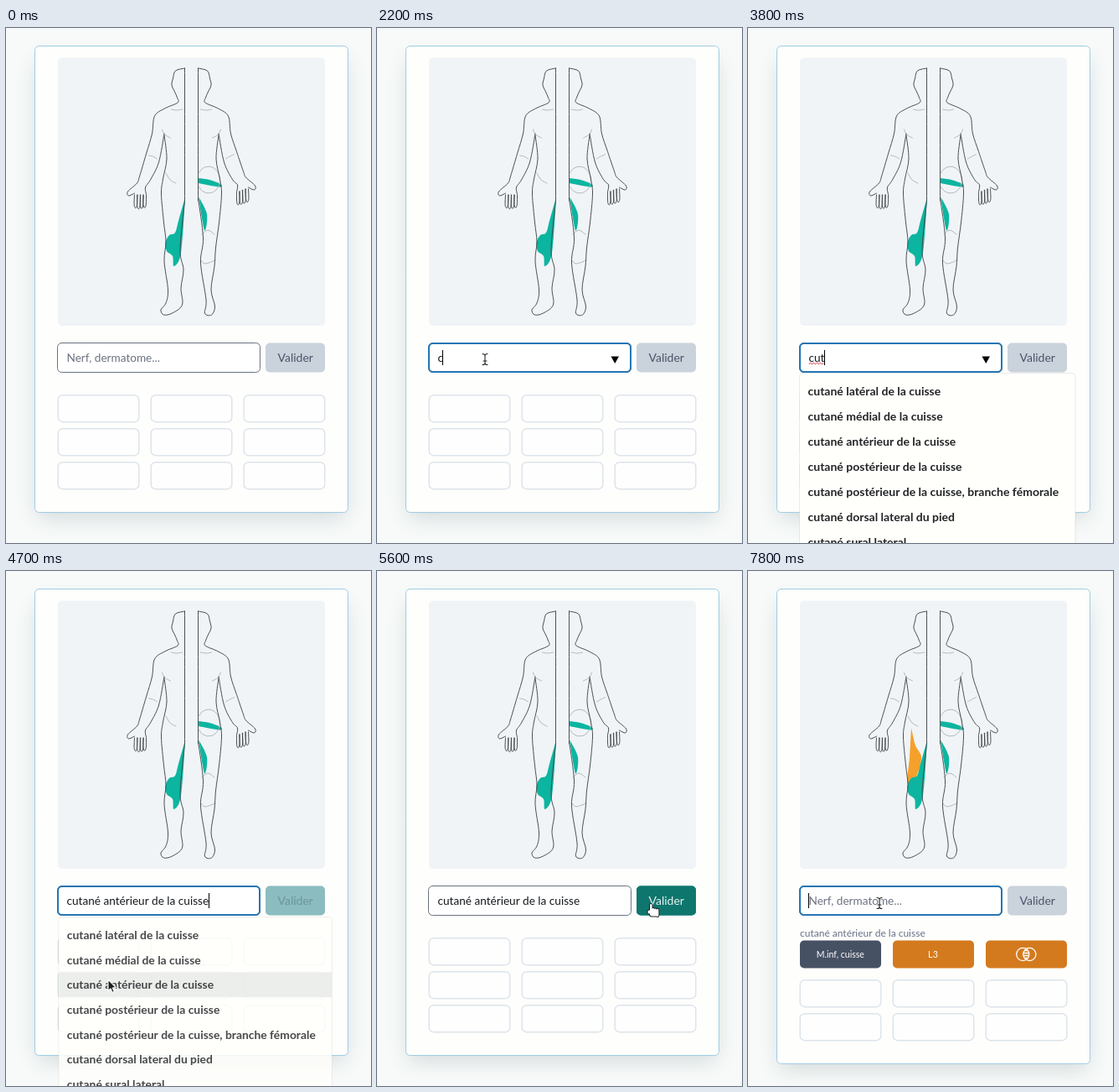
Write an HTML page with a canvas that moves like this. It is 436 by 614 pixels and loops after 8 s.

```html
<!DOCTYPE html>
<html lang="fr">
<head>
<meta charset="utf-8">
<title>Nerf, dermatome</title>
<style>
html, body { margin: 0; width: 100%; height: 100%; overflow: hidden; background: #f7faf9; }
canvas { display: block; width: 436px; height: 614px; }
</style>
</head>
<body>
<canvas id="stage"></canvas>
<script>
const W = 436, H = 614, LOOP = 8000, STEP = 100;
const FONT = 'Lato, "Open Sans", sans-serif';
const TEAL = '#0cb5a0', ORANGE = '#f5a02a', INK = '#454749', FAINT = '#a3a9ae';
const ANSWER = 'cutané antérieur de la cuisse';
const OPTIONS = [
  'cutané latéral de la cuisse', 'cutané médial de la cuisse', ANSWER,
  'cutané postérieur de la cuisse', 'cutané postérieur de la cuisse, branche fémorale',
  'cutané dorsal lateral du pied', 'cutané sural lateral'
];
const FOCUS = 1300, OPEN = 2400, SELECT = 4700, BLUR = 5600, RESULT = 5900, REFOCUS = 7800;
const TYPED = [[2000, 'c'], [OPEN, 'cu'], [2600, 'cut'], [SELECT, ANSWER], [RESULT, '']];
const ROW = 30, LIST_TOP = 418;

const canvas = document.getElementById('stage');
const ctx = canvas.getContext('2d');
const dpr = window.devicePixelRatio || 1;
canvas.width = W * dpr;
canvas.height = H * dpr;

const clamp = v => Math.max(0, Math.min(1, v));
const ramp = (t, from, to) => clamp((t - from) / (to - from));
const ease = k => k * k * (3 - 2 * k);
const mix = (a, b, k) => a + (b - a) * k;
const within = (t, from, to) => t >= from && t < to;

function box(x, y, w, h, r, fill, stroke, lw = 1) {
  ctx.beginPath();
  ctx.roundRect(x, y, w, h, r);
  if (fill) { ctx.fillStyle = fill; ctx.fill(); }
  if (stroke) { ctx.strokeStyle = stroke; ctx.lineWidth = lw; ctx.stroke(); }
}

function text(str, x, y, size, color, align = 'left', weight = 400) {
  ctx.font = `${weight} ${size}px ${FONT}`;
  ctx.textAlign = align;
  ctx.fillStyle = color;
  ctx.fillText(str, x, y);
}

function faded(alpha, draw) {
  if (alpha <= 0) return;
  ctx.save();
  ctx.globalAlpha *= alpha;
  draw();
  ctx.restore();
}

// Smooth curve through key points
function curve(points) {
  const path = new Path2D(), last = points.length - 1;
  const at = i => points[Math.max(0, Math.min(last, i))];
  path.moveTo(...points[0]);
  for (let i = 0; i < last; i++) {
    const [a, b, c, d] = [at(i - 1), at(i), at(i + 1), at(i + 2)];
    path.bezierCurveTo(b[0] + (c[0] - a[0]) / 6, b[1] + (c[1] - a[1]) / 6,
      c[0] - (d[0] - b[0]) / 6, c[1] - (d[1] - b[1]) / 6, c[0], c[1]);
  }
  return path;
}

// Half a body: x is the distance from the midline
const ARM = [[0, 48], [11, 51], [14, 60], [15.5, 68], [12, 76], [9, 83], [8.5, 89], [24, 96],
  [36, 105], [39, 126], [46, 150], [54, 177], [57, 185], [68, 195], [67, 200], [60, 197]];
const INNER_ARM = [[46, 198], [47, 190], [41, 181], [31, 160], [24.5, 126]];
const FLANK = [[24.5, 128], [21.5, 156], [26, 180], [28, 198], [25, 232]];
const FRONT_LEG = [[22.5, 255], [24.5, 278], [20, 312], [22.5, 328], [28.5, 336], [25, 342], [15, 340],
  [3, 330], [4.5, 310], [1.5, 288], [5.5, 264], [0, 206]];
const BACK_LEG = [[21, 262], [19.5, 284], [15.5, 312], [20, 332], [16, 342], [8, 340], [9.5, 324],
  [3, 280], [6, 250], [0, 203]];

function finger(i) {
  const x = 60 - 3.6 * i, tip = 216 - Math.abs(i - 1.3);
  return [[x, 199], [x + 0.4, tip - 4], [x - 1.3, tip], [x - 3, tip - 4], [x - 3.2, 199]];
}

function halfBody(midline, dir, lift, leg) {
  const place = ([d, y]) => [midline + dir * d, y - lift * ramp(d, 40, 56)];
  const parts = [ARM, INNER_ARM, [...FLANK, ...leg], [[0, 48], [0, 206]], ...[0, 1, 2, 3].map(finger)];
  const folds = [[[27, 121], [24, 127], [17, 131]], [[43, 152], [38, 153], [33, 156]], [[3, 97], [10, 98], [16, 97]]];
  const paths = list => list.map(p => curve(p.map(place)));
  return { lines: paths(parts), folds: paths(folds) };
}

const halves = [halfBody(213.5, -1, 0, FRONT_LEG), halfBody(229.5, 1, 7, BACK_LEG)];
const creases = [
  [[191, 173], [196, 181], [203, 185]],
  [[234, 246], [241, 241], [249, 246]],
  [[233, 277], [238, 281], [250, 277]]
].map(curve);
const zones = [
  [[214, 202], [206, 230], [202, 244], [195, 247], [190.5, 256], [192, 266], [199, 272], [200.5, 284], [209, 268], [214, 202]],
  [[230, 179], [243, 181], [256, 186], [255, 189.5], [230, 185]],
  [[230, 201], [240, 222], [237, 241], [230, 201]]
].map(curve);
const thigh = curve([[195, 187], [200, 208], [207, 222], [201, 245], [190.5, 253], [193, 222], [195, 187]]);

function drawBody(found) {
  box(62, 35.5, 319, 319.5, 5, '#f0f4f7');
  faded(found, () => { ctx.fillStyle = ORANGE; ctx.fill(thigh); });
  ctx.fillStyle = TEAL;
  zones.forEach(z => ctx.fill(z));
  ctx.lineJoin = ctx.lineCap = 'round';
  ctx.lineWidth = 0.8;
  ctx.strokeStyle = FAINT;
  creases.forEach(c => ctx.stroke(c));
  halves.forEach(h => h.folds.forEach(f => ctx.stroke(f)));
  ctx.beginPath();
  ctx.ellipse(242, 181, 13.5, 16, 0, -2.6, 2.6);
  ctx.stroke();
  ctx.lineWidth = 0.95;
  ctx.strokeStyle = INK;
  halves.forEach(h => h.lines.forEach(l => ctx.stroke(l)));
}

function drawCard(bottom) {
  ctx.save();
  ctx.shadowColor = 'rgba(60,80,90,.2)';
  ctx.shadowBlur = 26 * dpr;
  ctx.shadowOffsetY = 9 * dpr;
  box(38, 30, 367, bottom - 33, 5, '#fefefc');
  ctx.restore();
  box(34.5, 21.5, 374, bottom - 21.5, 5, '#fefefc', '#9fcde3');
}

function caretOn(t) {
  const since = [FOCUS, ...TYPED.map(k => k[0]), REFOCUS].filter(k => k <= t).pop();
  return (t - since) % 1000 < 500;
}

function drawInput(t) {
  const value = (TYPED.filter(k => k[0] <= t).pop() || [0, ''])[1];
  const focus = within(t, FOCUS, BLUR) || t >= REFOCUS;
  box(61.5, 375.5, 242, 35, 5, '#fff', '#6b7280');
  if (focus) box(62, 376, 241, 34, 5, '#fff', '#2476b5', 2);
  text(value || 'Nerf, dermatome...', 72.5, 397.5, 13.6, value ? '#15181c' : '#6b7280');
  const end = 72.5 + (value ? ctx.measureText(value).width : 0);
  if (within(t, 2600, SELECT)) {
    ctx.beginPath();
    for (let x = 73; x <= end - 1; x++) ctx.lineTo(x, 400 + (x % 4 < 2 ? 0.7 : -0.7));
    ctx.strokeStyle = '#dc3545';
    ctx.lineWidth = 0.9;
    ctx.stroke();
  }
  ctx.fillStyle = '#000';
  if (focus && caretOn(t)) ctx.fillRect(Math.round(end - 0.5), 384, 1, 18);
  if (within(t, 2000, SELECT)) {
    ctx.beginPath();
    ctx.moveTo(279.5, 391.5);
    ctx.lineTo(289, 391.5);
    ctx.lineTo(284.2, 400);
    ctx.fill();
  }
}

function drawButton(t) {
  const live = ramp(t, 4600, 4900) * (1 - ramp(t, 5800, 6200));
  const layer = (alpha, fill, color) => faded(alpha, () => {
    box(310, 375.5, 71, 35, 5, fill);
    text('Valider', 345.7, 397.5, 14, color, 'center');
  });
  layer(1, '#cad2dc', '#4a5568');
  layer(live, '#0d9488', '#f2fbfa');
  layer(live * ramp(t, 5200, 5500), '#0f766e', '#e6f3f1');
}

const colX = i => 62 + 111 * i;

function drawRow(y) {
  for (let i = 0; i < 3; i++) box(colX(i) + 0.2, y + 0.7, 96.6, 32, 5.5, '#fefefe', '#dde4eb', 1.5);
}

function drawRings(cx, cy) {
  const ring = x => { ctx.beginPath(); ctx.arc(x, cy, 7.6, 0, 7); };
  const centers = [cx - 4, cx + 4];
  ctx.strokeStyle = '#fff';
  ctx.lineWidth = 1.3;
  centers.forEach(x => { ring(x); ctx.stroke(); });
  ctx.save();
  centers.forEach(x => { ring(x); ctx.clip(); });
  ctx.beginPath();
  for (let y = cy - 4.5; y <= cy + 5; y += 3) { ctx.moveTo(cx - 5, y); ctx.lineTo(cx + 5, y); }
  ctx.stroke();
  ctx.restore();
}

function drawGuesses(t) {
  const done = t >= RESULT;
  for (let i = done ? 1 : 0; i < 3; i++) drawRow(437 + 40 * i + (done ? 10 : 0));
  if (!done) return;
  faded(ramp(t, 5800, 6200), () => {
    text(ANSWER, 62, 436, 12, '#667085');
    for (let i = 0; i < 3; i++) box(colX(i), 440.5, 97, 33, 5, i ? '#d47a1e' : '#475164');
    text('M.inf, cuisse', 110.3, 461, 10.5, '#fff', 'center');
    text('L3', 221, 461, 10.8, '#fff', 'center');
    drawRings(332.3, 457);
  });
}

function drawList(t, pointer) {
  const gone = ramp(t, 4650, 4950);
  if (t < OPEN || gone === 1) return;
  const scale = 1 - 0.052 * gone;
  faded(1 - gone, () => {
    ctx.translate(226, 527);
    ctx.scale(scale, scale);
    ctx.translate(-226, -527);
    box(61.5, 411.5, 329.5, 232, 4, '#fffffc', 'rgba(0,0,0,.08)');
    if (pointer) {
      const active = Math.floor((pointer.y - LIST_TOP) / ROW);
      ctx.fillStyle = '#e9ebe9';
      ctx.fillRect(62, LIST_TOP + ROW * active, 329, ROW);
    }
    OPTIONS.forEach((o, i) => text(o, 71.5, LIST_TOP + 20 + ROW * i, 14, '#222426', 'left', 700));
  });
}

// Pointer travels: start, end, from, to
const MOVES = [
  [700, 900, [82, 395], [129, 395]],
  [4300, 4500, [124, 428], [122, 487]],
  [4900, 5400, [122, 487], [327, 397]],
  [5900, 6300, [327, 397], [243, 271]],
  [6500, 6900, [243, 271], [192, 221]],
  [7100, 7700, [192, 221], [157, 396]]
];

// Hidden before it enters and while typing
function pointerAt(t) {
  if (t < MOVES[0][0] || within(t, OPEN, MOVES[1][0])) return null;
  const [from, to, a, b] = MOVES.filter(m => t >= m[0]).pop();
  const k = ease(ramp(t, from, to));
  return { x: mix(a[0], b[0], k), y: mix(a[1], b[1], k) };
}

function drawBeam() {
  for (const [color, lw] of [['#fff', 2.6], ['#222', 1.1]]) {
    ctx.beginPath();
    for (const sx of [-1, 1]) for (const sy of [-1, 1]) {
      ctx.moveTo(3 * sx, 6.5 * sy);
      ctx.quadraticCurveTo(0, 6.5 * sy, 0, 4.5 * sy);
      ctx.lineTo(0, 0);
    }
    ctx.moveTo(-2, 2);
    ctx.lineTo(2, 2);
    ctx.strokeStyle = color;
    ctx.lineWidth = lw;
    ctx.stroke();
  }
}

function drawHand() {
  const hand = new Path2D();
  for (let i = 0; i < 4; i++) hand.roundRect(-1 + 2.6 * i, i ? 4.5 + 0.5 * i : 0, 2.6, 9, 1.3);
  hand.roundRect(-3.5, 7.5, 3.5, 4, 1.5);
  hand.roundRect(-1, 8, 10.2, 6.5, 2);
  ctx.strokeStyle = '#222';
  ctx.lineWidth = 2;
  ctx.stroke(hand);
  ctx.fillStyle = '#fff';
  ctx.fill(hand);
}

function drawArrow() {
  ctx.beginPath();
  [[0, 0], [0, 13.5], [3, 10.8], [5, 15.5], [7.3, 14.5], [5.3, 10], [9.3, 9.6]].forEach(p => ctx.lineTo(...p));
  ctx.closePath();
  ctx.lineWidth = 1.1;
  ctx.fillStyle = '#1d1d1f';
  ctx.strokeStyle = '#fff';
  ctx.fill();
  ctx.stroke();
}

function drawPointer({ x, y }) {
  const inBar = within(y, 375, 411);
  ctx.save();
  ctx.translate(x, y);
  if (inBar && x < 304) drawBeam();
  else if (inBar && within(x, 310, 381)) drawHand();
  else drawArrow();
  ctx.restore();
}

function frame(now) {
  const t = Math.floor((now % LOOP) / STEP) * STEP;
  const pointer = pointerAt(t);
  ctx.setTransform(dpr, 0, 0, dpr, 0, 0);
  ctx.fillStyle = '#f7faf9';
  ctx.fillRect(0, 0, W, H);
  drawCard(t < RESULT ? 577.5 : 587.5);
  drawBody(ramp(t, 5800, 6200));
  drawInput(t);
  drawButton(t);
  drawGuesses(t);
  drawList(t, pointer);
  if (pointer) drawPointer(pointer);
}

const start = performance.now();
function tick() {
  frame(performance.now() - start);
  requestAnimationFrame(tick);
}
tick();
</script>
</body>
</html>
```
